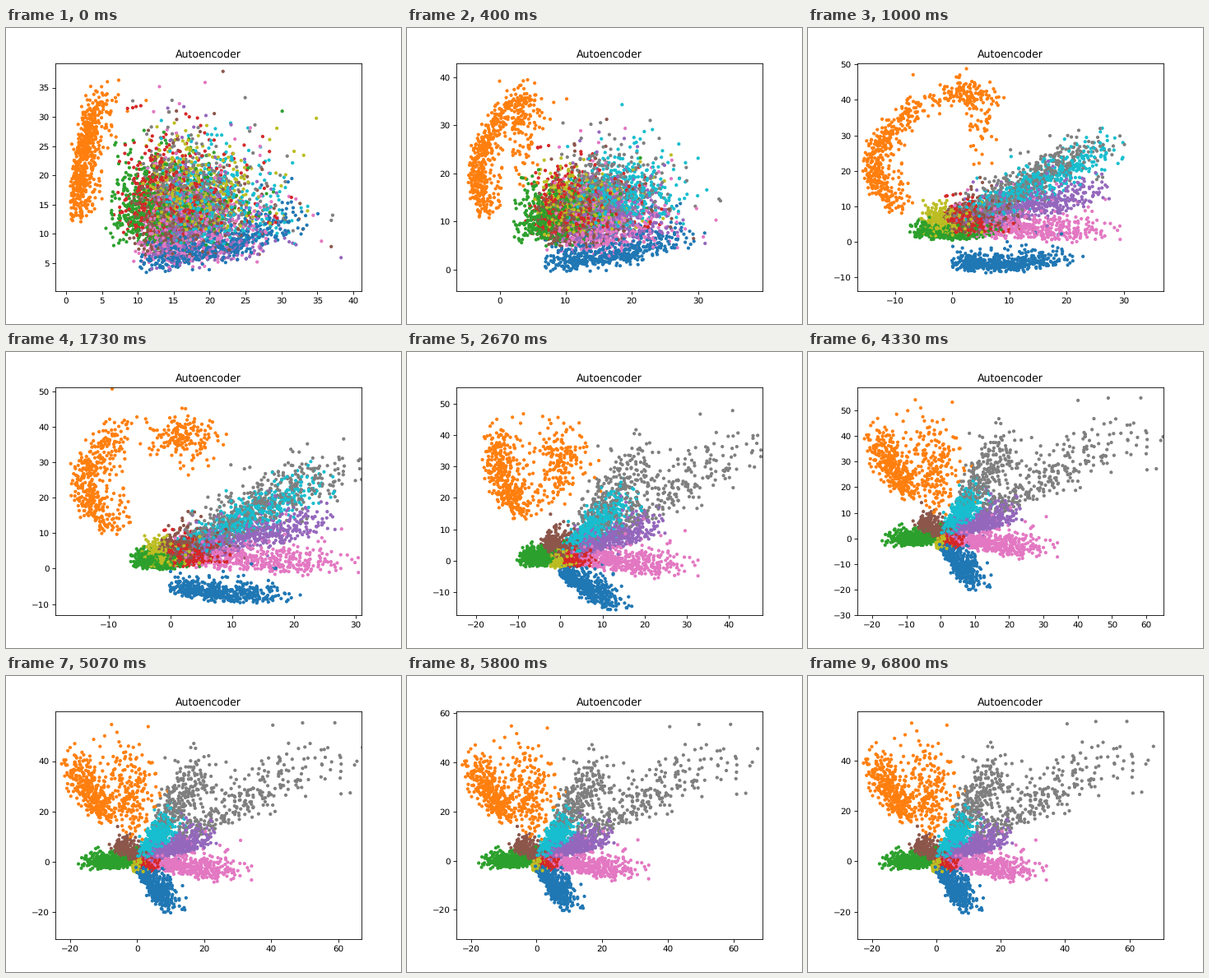
A matplotlib script that plays this animation: 480 px wide and 360 px high, repeating every 6990 ms.

```python
import numpy as np
import matplotlib.pyplot as plt
from matplotlib.animation import FuncAnimation

LOOP_MS = 6990
STEPS = 21
HUB = np.array([1, 5])      # where the arms meet while they spread out
plt.rcParams["text.hinting"] = "none"
rng = np.random.default_rng(7)


# Each shape maps a position along it (s) and a random offset (z) to points.
def blob(x, y):
    return lambda s, z: (x, y) + 4.3 * z


def arc(a, b, c, width):
    a, b, c = map(np.array, (a, b, c))
    return lambda s, z: (1 - s)**2 * a + 2 * s * (1 - s) * b + s**2 * c + width * z


def arm(x, y):
    return lambda s, z: HUB + s * ((x, y) - HUB) + 2.2 * z


def wedge(x, y, near=0.05):
    """A ray out of the origin that widens with distance."""
    fan = 0.08 * np.hypot(x, y)

    def shape(s, z):
        s = near + (1 - near) * s
        return s * (x, y) + (1 + fan * s) * z
    return shape


# Colour index, number of points, then the shape at the start, spread out, and as a star.
CLUSTERS = [
    (0, 460, arc((11, 6), (22, 6), (34, 15), 1.6),
     arc((1, -5), (8, -8), (22, -3), 1.6), wedge(11, -19)),
    (1, 400, arc((2, 12), (1.8, 23), (5, 34), 0.9),
     arc((-8, 8), (-22, 25), (2, 46), 1.5), wedge(-19, 42, 0.4)),
    (1, 170, arc((6, 35), (1, 26), (4, 14), 1.2),
     arc((-2, 40), (7, 50), (5, 18), 1.7), wedge(-2, 52, 0.2)),
    (2, 530, blob(13, 15), arc((-6, 3.5), (0, 2), (8, 3.5), 1.3), wedge(-16, 0)),
    (3, 500, blob(14.5, 16.5), arm(5, 6), wedge(5, -2)),
    (4, 500, blob(18, 11.5), arm(27, 16), wedge(22, 12)),
    (5, 456, blob(16, 13), arm(7, 8), wedge(-6, 8)),
    (6, 462, blob(17, 11.5), arm(28, 3), wedge(31, -4)),
    (7, 256, blob(17, 16.5), arm(26, 29), wedge(22, 42, 0.3)),
    (7, 256, blob(18, 16), arm(28, 31), wedge(62, 48, 0.2)),
    (8, 489, blob(18, 17), arm(-3, 6), wedge(1, -3)),
    (9, 520, blob(20, 15), arm(29, 28), wedge(11, 18)),
]

# Key axis limits: left, right, bottom, top.
VIEWS = {
    0: (-1.49, 41.15, 0.16, 39.2),
    3: (-16.63, 36.99, -14.05, 50.4),
    5: (-18.59, 30.93, -13.2, 51.2),
    8: (-24.69, 48.0, -17.45, 55.3),
    13: (-24.3, 65.05, -30.02, 59.07),
    17: (-24.4, 68.9, -32.0, 60.77),
    20: (-24.5, 70.6, -30.9, 59.5),
}


def scatter_cluster(count, shapes):
    s = rng.beta(1.6, 2, (count, 1))
    z = rng.gamma(4, 0.5, (count, 2)) - 2    # sharp lower edge, long upper tail
    return [shape(s, z) for shape in shapes]


clouds = np.concatenate([scatter_cluster(n, shapes) for _, n, *shapes in CLUSTERS], axis=1)
colours = np.repeat([c[0] for c in CLUSTERS], [c[1] for c in CLUSTERS])
order = rng.permutation(colours.size)
start, spread, star = clouds[:, order]


def points_at(step):
    if step < 3:
        return start + (spread - start) * step / 3
    settle = 1 - np.exp(-((step - 3) / 4.6)**1.7)
    return spread + (star - spread) * settle


fig, ax = plt.subplots(figsize=(6.4, 4.8), dpi=75)
fig.subplots_adjust(top=0.8815)
ax.set_title("Autoencoder")
dots = ax.scatter(*start.T, c=colours[order], cmap="tab10", vmin=0, vmax=9, marker=".", s=36)


def update(step):
    dots.set_offsets(points_at(step))
    left, right, bottom, top = [np.interp(step, list(VIEWS), v) for v in zip(*VIEWS.values())]
    ax.set_xlim(left, right)
    ax.set_ylim(bottom, top)
    return [dots]


anim = FuncAnimation(fig, update, frames=STEPS, interval=LOOP_MS / STEPS,
                     init_func=lambda: update(0), repeat=True, repeat_delay=0)
plt.show()
```
